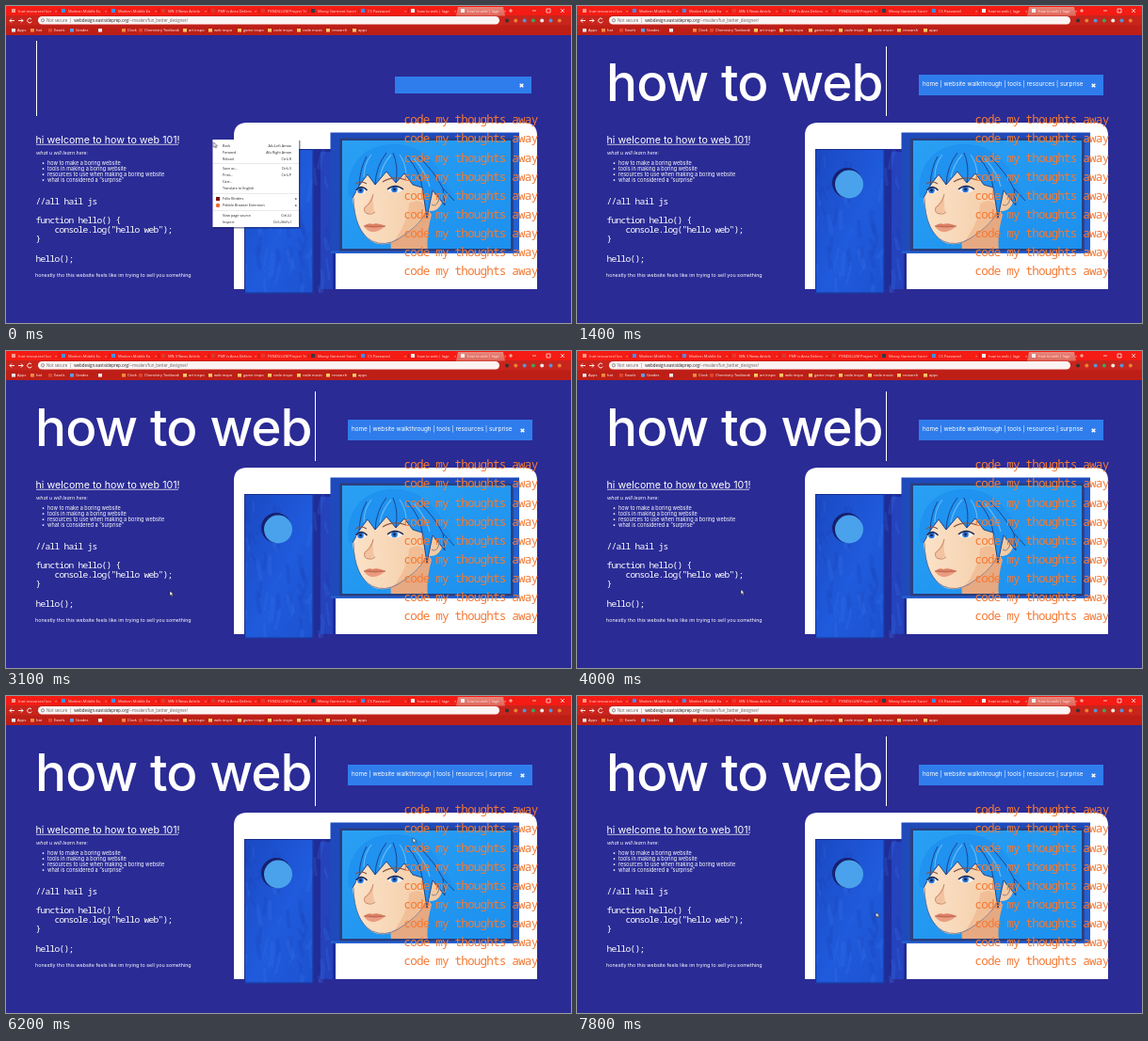
Animation, 600 px wide and 337 px high, one loop 8 s. Source, as an HTML page:

```html
<!DOCTYPE html>
<html lang="en">
<head>
<meta charset="utf-8">
<title>how to web</title>
<style>
html, body { margin: 0; width: 100%; height: 100%; overflow: hidden; background: #2a2b95; }
#stage { position: absolute; left: 0; top: 0; width: 600px; height: 337px; overflow: hidden; background: #2a2b95; }
svg { position: absolute; left: 0; top: 0; }
text { white-space: pre; }
.sans { font-family: Inter, "Open Sans", sans-serif; fill: #fff; }
.mono { font-family: "Noto Sans Mono", "DejaVu Sans Mono", monospace; fill: #fff; }
.ui { font-family: "Open Sans", "Noto Sans", sans-serif; }

#title {
  position: absolute; left: 32px; top: 43px; width: 296px; height: 74px;
  overflow: hidden; white-space: nowrap; border-right: 1px solid #fff;
  font: 500 55px/76px Inter, "Open Sans", sans-serif; font-optical-sizing: none;
  letter-spacing: -.9px; color: #fff; text-indent: -1px;
  animation: type 8s infinite, settle 8s step-end infinite;
}
#nav {
  position: absolute; left: 363px; top: 73px; width: 196px; height: 22px;
  background: #2f7dec; color: #fff; overflow: hidden;
  animation: open 8s infinite;
}
#nav span {
  position: absolute; right: 21.5px; top: 0; white-space: nowrap;
  font: 6.35px/21px Inter, "Open Sans", sans-serif;
  animation: appear 8s step-end infinite;
}
#nav svg { left: auto; right: 8px; top: 50%; margin-top: -2.5px; }
#menu { animation: dismiss 8s step-end infinite; }
#pointer { animation: wander 8s linear infinite; }

@keyframes type { 0% { width: 0; animation-timing-function: ease; } 10%, 100% { width: 296px; } }
@keyframes settle { 0% { top: 37px; height: 80px; } 1.25%, 100% { top: 43px; height: 74px; } }
@keyframes open {
  0%, 1.25% { left: 413px; width: 145px; top: 75px; height: 18px; animation-timing-function: ease-out; }
  5%, 100% { left: 363px; width: 196px; top: 73px; height: 22px; }
}
@keyframes appear { 0% { opacity: 0; } 2.5%, 100% { opacity: 1; } }
@keyframes dismiss { 0% { visibility: visible; } 1.25%, 100% { visibility: hidden; } }
@keyframes wander {
  0%, 1.25% { transform: translate(220.5px, 145px); }
  8.75% { transform: translate(168px, 210px); animation-timing-function: ease-in; }
  11.5%, 28% { transform: translate(172px, 340px); animation-timing-function: ease-out; }
  40%, 52% { transform: translate(174px, 253.5px); animation-timing-function: ease-in-out; }
  66%, 70% { transform: translate(492px, 103.5px); animation-timing-function: ease-in-out; }
  87.5% { transform: translate(334px, 228px); animation-timing-function: ease-out; }
  97.5%, 100% { transform: translate(317.5px, 230px); }
}
</style>
</head>
<body>
<div id="stage">
  <svg id="page" width="600" height="337" viewBox="0 0 600 337">
    <defs>
      <linearGradient id="door" x2="1" y2="1">
        <stop offset="0" stop-color="#1b48c2"/><stop offset=".55" stop-color="#1f5bdc"/><stop offset="1" stop-color="#1d52d0"/>
      </linearGradient>
      <linearGradient id="sky" x2="1" y2="1">
        <stop offset="0" stop-color="#2aa0f4"/><stop offset="1" stop-color="#1c90ee"/>
      </linearGradient>
      <linearGradient id="skin" x2="1">
        <stop offset="0" stop-color="#fbe2c8"/><stop offset="1" stop-color="#f2c8a0"/>
      </linearGradient>
      <linearGradient id="activeTab" x2="0" y2="1">
        <stop offset="0" stop-color="#e9877c"/><stop offset="1" stop-color="#e0675a"/>
      </linearGradient>
      <clipPath id="canvasArea"><path d="M357 143H536V258H357z"/></clipPath>
      <clipPath id="doorArea"><path d="M253 152H349V305H253z"/></clipPath>
    </defs>

    <!-- browser chrome -->
    <path fill="#f41c14" d="M0 0H600V11H0z"/>
    <path fill="#c8251c" d="M0 10H600V21H0z"/>
    <path fill="url(#activeTab)" d="M478 10.500L480 1H528L530 10.500z"/>
    <rect x="34" y="11" width="490" height="8.500" rx="4.250" fill="#fbf4f3"/>
    <path fill="#bd1f17" d="M0 20.500H600V31H0z"/>
    <g stroke="#fff" stroke-width=".9" fill="none">
      <path d="M9 15.500H4M6 13.500L4 15.500L6 17.500M13 15.500H18M16 13.500L18 15.500L16 17.500M27 14A2.400 2.400 0 1 0 27.300 16.500"/>
      <path d="M559 5H563M574 3H578V7H574zM589 3L593 7M593 3L589 7M534 5H538M536 3V7" stroke-width=".7"/>
      <circle cx="39" cy="15.300" r="1.600" stroke="#555" stroke-width=".6"/>
    </g>
    <g id="tabs" class="ui" font-size="4" fill="#ffe4df"></g>
    <text class="ui" x="43" y="17" font-size="4.4" fill="#666">Not secure  |  <tspan fill="#222">webdesign.eastsideprep.org</tspan>/~mvalen/fun_better_designer/</text>
    <g id="marks" class="ui" font-size="4" fill="#fff"></g>
    <g id="tools"></g>

    <!-- text column -->
    <g class="sans">
      <text x="31.500" y="145.500" font-size="10.7">hi welcome to how to web 101!</text>
      <path d="M32 147.300H183" stroke="#fff" stroke-width=".7"/>
      <text x="32" y="158" font-size="5.3" font-style="italic">what u will learn here:</text>
      <g id="list" font-size="5.5"></g>
      <text x="31" y="288" font-size="5.37">honestly tho this website feels like im trying to sell you something</text>
    </g>
    <g id="code" class="mono" font-size="9.6" letter-spacing="-.76"></g>

    <!-- artwork -->
    <path fill="#fff" d="M242 301V138Q242 124 256 124H550Q564 124 564 138V301z"/>
    <path fill="#202c98" d="M326 152H350V301H326z"/>
    <path fill="#2443bd" d="M334 155H347V301H334z"/>
    <path fill="url(#door)" d="M253 152H326.500V305.500H253z"/>
    <g id="scratches" clip-path="url(#doorArea)" fill="none"></g>
    <path fill="none" stroke="#1a2c86" stroke-width=".9" d="M253.500 152.500H326V305H253.500z"/>
    <circle cx="287" cy="188" r="16" fill="#17206f"/>
    <circle cx="289" cy="189.500" r="15" fill="#4aa2ec"/>

    <path fill="#1f4abb" d="M344.500 134.500H545V263H344.500z"/>
    <path fill="#2560cf" d="M539 140H545V263H539zM345 260.500H545V263H345z"/>
    <path fill="#2c3f7c" d="M354 140.500H538.500V260.500H354z"/>
    <path fill="url(#sky)" d="M357 143H536V258H357z"/>
    <g clip-path="url(#canvasArea)">
      <path fill="#e6a982" d="M408 246L446 212L452 222Q446 243 448 260H409z"/>
      <path fill="url(#skin)" d="M369 178C366 195 368 207 370 216C372 231 379 244 388 250C396 255 406 254 414 249C429 241 441 231 447 217C460 222 467 206 463 196C458 187 452 192 449 196L430 165L390 164z"/>
      <path fill="#eeb288" opacity=".6" d="M428 210Q443 202 446 217Q436 236 412 250Q428 227 428 210z"/>
      <path fill="#efb28c" opacity=".6" d="M382 213Q379 218 384 221L391 219Q389 208 390 200Q386 208 382 213z"/>
      <path fill="#2092f0" d="M364 203C360 173 376 150 406 147C444 144 463 172 476 207L464 194L466 212L453 196L447 225L442 193L432 190L423 178L414 188L404 176L392 190L384 179L375 191L368 204z"/>
      <path fill="none" stroke="#1b3c80" stroke-width=".9" stroke-linejoin="round" d="M368 204L375 191L384 179L392 190L404 176L414 188L423 178L432 190L442 193L447 225L453 196L466 212L464 194L476 207M383 160Q376 172 375 191M404 156Q393 170 392 190M411 156Q417 170 414 188M426 160Q440 176 442 193M438 160Q455 176 464 194"/>
      <path fill="none" stroke="#7ccbfb" stroke-width="1.200" opacity=".7" d="M388 158Q380 168 380 182M409 158Q400 168 397 182M418 158Q424 166 425 178M433 162Q447 178 450 192"/>
      <path fill="none" stroke="#5a5a80" stroke-width=".7" d="M369 204Q370 240 389 250Q402 256 416 248Q438 235 447 218M455 200Q462 198 459 208Q456 214 452 211"/>
      <g id="eyes"></g>
      <path fill="none" stroke="#8a5646" stroke-width="1.200" d="M371 189Q377 185 383 189M400 187Q411 180 425 185"/>
      <path fill="none" stroke="#c37d5e" stroke-width=".9" d="M390 200Q388 210 381 214Q379 220 385 221Q389 222 392 219"/>
      <path fill="#dd7f64" d="M380 234Q385 230 389 232Q395 230 403 234Q392 236 380 234z"/>
      <path fill="#ea9c80" d="M380 234Q392 236 403 234Q395 241 388 240Q383 239 380 234z"/>
      <path fill="none" stroke="#a0503f" stroke-width=".7" d="M380 234Q392 236 403 234"/>
    </g>
    <g id="chant" class="mono" font-size="12.6" letter-spacing="-.8" style="fill:#f47a35"></g>
  </svg>

  <div id="title">how to web</div>
  <div id="nav">
    <span>home | website walkthrough | tools | resources | surprise</span>
    <svg width="5" height="5"><path d="M.7 .7L4.300 4.300M4.300 .7L.7 4.300" stroke="#fff" stroke-width="1.500"/></svg>
  </div>

  <svg id="over" width="600" height="337" viewBox="0 0 600 337">
    <g id="menu" class="ui" font-size="3.7">
      <path fill="#151a55" opacity=".5" d="M220 143H312.500V236.500H220z"/>
      <path fill="#fff" d="M219.500 142H311V235H219.500z"/>
      <path stroke="#d4d4d8" stroke-width=".5" d="M220 167.500H311M220 199.500H311M220 217.500H311"/>
      <g id="items" fill="#222"></g>
      <path fill="#7d1111" d="M223 203H227V207H223z"/>
      <circle cx="225" cy="212" r="2.200" fill="#ef6a2e"/>
    </g>
    <path id="pointer" d="M0 0V5.200L1.300 4.100L2.300 6L3.200 5.500L2.300 3.700H4z" fill="#fff" stroke="#111" stroke-width=".5"/>
  </svg>
</div>

<script>
const NS = 'http://www.w3.org/2000/svg';

function add(parent, tag, attrs, content) {
  const el = document.createElementNS(NS, tag);
  for (const key in attrs) el.setAttribute(key, attrs[key]);
  if (content) el.textContent = content;
  document.getElementById(parent).append(el);
}
const label = (parent, x, y, content, more) => add(parent, 'text', { x, y, ...more }, content);

const tabs = ['(not resources) (un', 'Modern Middle Eu', 'Modern Middle Ea', 'MN 3 News Article', 'PMF is Area Defens',
  'PENDULUM Project 1', 'Mossy Garment Surv', 'CS Password', 'how to web | lage', 'how to web | lage'];
const tabColors = ['#ff9b8c', '#4a8cf0', '#4a8cf0', '#e23a2c', '#d63a30', '#e23a2c', '#333a44', '#3c8ce8', '#eee', '#eee'];
tabs.forEach((name, i) => {
  const x = 6 + i * 53;
  add('tabs', 'rect', { x, y: 3, width: 4, height: 4, fill: tabColors[i] });
  label('tabs', x + 7, 6.6, name);
  label('tabs', x + 46, 6.6, '×');
  if (i < 8) add('tabs', 'rect', { x: x + 50, y: 2.5, width: .4, height: 5, fill: '#a80d08' });
});

const marks = [['Apps', 12], ['hat', 32], ['Easels', 51], ['Grades', 74], ['', 104], ['Clock', 129], ['Chemistry Textbook', 147],
  ['art inspo', 194], ['web inspo', 221], ['game inspo', 252], ['code inspo', 284], ['code music', 315], ['research', 346], ['apps', 374]];
marks.forEach(([name, x], i) => {
  const fill = i > 6 ? '#f5c765' : ['#e8e8e8', '#f08a42', '#e2452e', '#5c9de8'][i % 4];
  add('marks', 'rect', { x: x - 6, y: 24, width: 4, height: 3.6, fill });
  label('marks', x, 27.4, name);
});

['#333', '#eb8136', '#5b92dc', '#41a45a', '#e8e8e8', '#5b92dc', '#eb8136'].forEach((fill, i) =>
  add('tools', 'circle', { cx: 532 + i * 9.3, cy: 15.5, r: 2, fill }));

['how to make a boring website', 'tools in making a boring website',
  'resources to use when making a boring website', 'what is considered a “surprise”'].forEach((line, i) => {
  const y = 169 + i * 6;
  add('list', 'circle', { cx: 39.5, cy: y - 1.9, r: .9 });
  label('list', 44, y, line);
});

[['//all hail js', 211.2], ['function hello() {', 231], ['    console.log("hello web");', 241], ['}', 250.5], ['hello();', 271.5]]
  .forEach(([line, y]) => label('code', 31.5, y, line));

for (let i = 0; i < 9; i++) label('chant', 422.5, 125.3 + i * 20.1, 'code my thoughts away');

for (const [x, y, w] of [[377, 196, 5.5], [413, 195, 8]]) {
  add('eyes', 'ellipse', { cx: x, cy: y, rx: w, ry: 3.5, fill: '#f4f2f2' });
  add('eyes', 'circle', { cx: x - .5, cy: y, r: 3.3, fill: '#2678dd' });
  add('eyes', 'circle', { cx: x - .5, cy: y, r: 1.4, fill: '#15224f' });
  add('eyes', 'path', { d: `M${x - w} ${y}q${w} -7 ${2 * w + 1} 0`, fill: 'none', stroke: '#1c2650', 'stroke-width': 1.4 });
}

const items = [['Back', 149.5, 'Alt+Left Arrow'], ['Forward', 156.5, 'Alt+Right Arrow'], ['Reload', 163.5, 'Ctrl+R'],
  ['Save as...', 174, 'Ctrl+S'], ['Print...', 181, 'Ctrl+P'], ['Cast...', 188], ['Translate to English', 195],
  ['Folio Binders', 206, '▸'], ['Pebblo Browser Extension', 213, '▸'], ['View page source', 224, 'Ctrl+U'], ['Inspect', 231, 'Ctrl+Shift+I']];
items.forEach(([name, y, key]) => {
  label('items', 230, y, name);
  if (key) label('items', key === '▸' ? 309 : 303, y, key, { 'text-anchor': 'end' });
});

// soft paint strokes on the door
let seed = 7;
const rand = () => (seed = seed * 16807 % 2147483647) / 2147483647;
for (let i = 0; i < 60; i++) {
  const x = 253 + rand() * 92, y = 153 + rand() * 150;
  add('scratches', 'path', {
    d: `M${x} ${y}q${rand() * 8 - 4} ${rand() * 10} ${rand() * 12 - 6} ${8 + rand() * 18}`,
    stroke: i % 2 ? '#3a78ea' : '#183cae', 'stroke-width': 1 + rand() * 4, opacity: .2
  });
}
</script>
</body>
</html>
```
